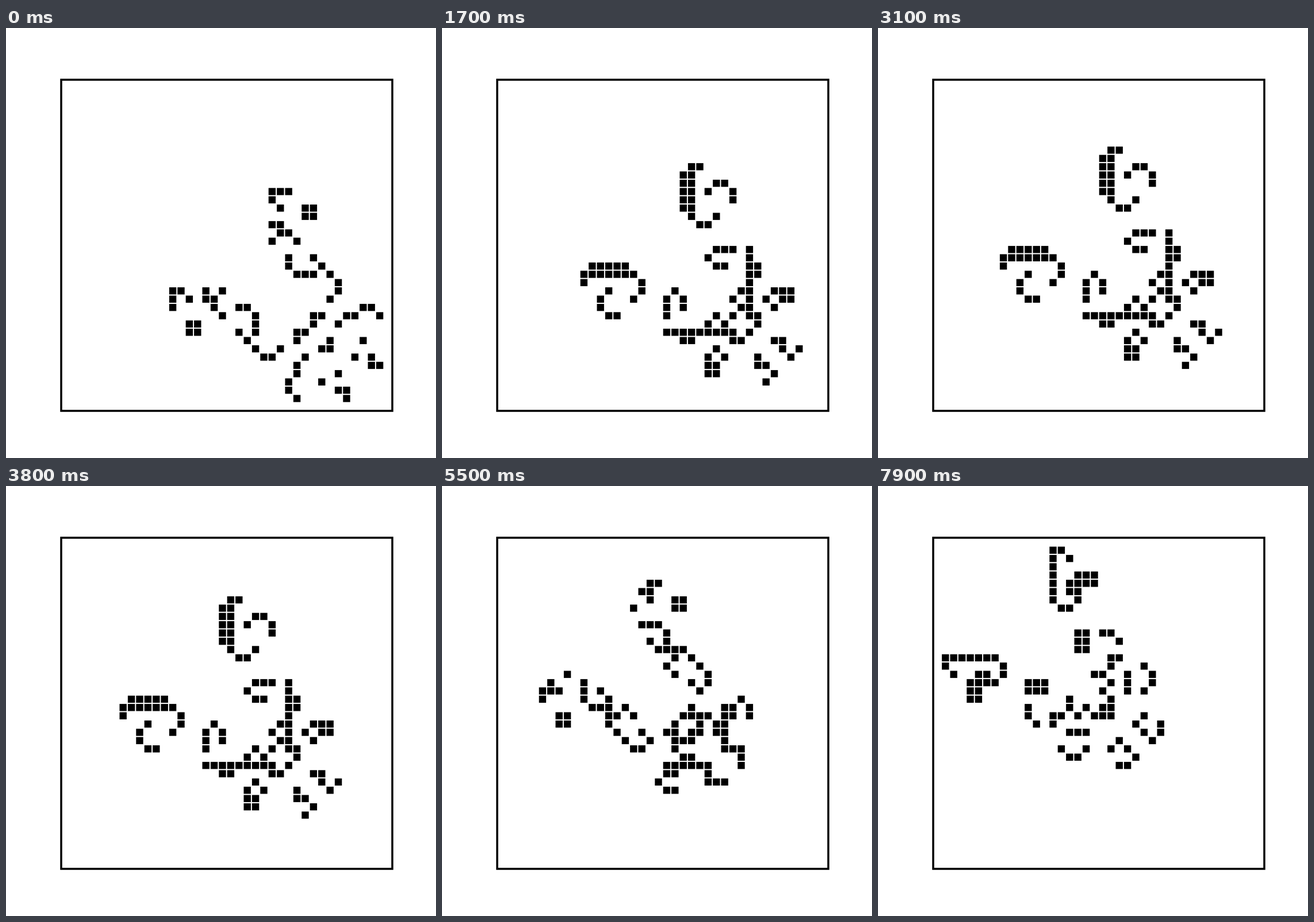
These frames come from a looping animation (748 px wide and 748 px high, 8000 ms). An HTML page with a canvas:

```html
<!DOCTYPE html>
<html>
<head>
<meta charset="utf-8">
<title>Diagonal spaceship</title>
<style>
  html, body { margin: 0; width: 100%; height: 100%; overflow: hidden; background: #fff; }
  canvas { display: block; }
</style>
</head>
<body>
<canvas id="stage" width="748" height="748"></canvas>
<script>
const ctx = document.getElementById('stage').getContext('2d');
const CELLS = 40, PITCH = 14.4, SIZE = 12.4, LEFT = 95.7, TOP = 90.1;
const STEP = 100, GENERATIONS = 80, LEAD = 4, OFFSET = 3;

let grid = Array.from({ length: CELLS }, () => Array(CELLS).fill(0));

// Walks from a cell along compass moves such as 'S6', mirrored across the diagonal.
function stroke(x, y, moves) {
  const mark = () => { grid[y + OFFSET][x + OFFSET] = grid[x + OFFSET][y + OFFSET] = 1; };
  mark();
  for (const move of moves.split(' ')) {
    const dx = move.includes('E') - move.includes('W');
    const dy = move.includes('S') - move.includes('N');
    const count = parseInt(move.replace(/\D/g, '')) || 1;
    for (let i = 0; i < count; i++) {
      x += dx;
      y += dy;
      mark();
    }
  }
}

// Claw
stroke(24, 10, 'W S6 SE E NE');
stroke(22, 11, 'S4');
stroke(25, 13, 'NE E SE S');
// Arm and body
stroke(28, 20, 'W2 SW SE E');
stroke(30, 20, 'S8 E S SW');
stroke(31, 22, 'S');
stroke(29, 25, 'SW SE SW');
// Tail
stroke(33, 27, 'NW NE E2 S W');
stroke(33, 31, 'E S SE NE');

function neighbours(row, col) {
  let count = -grid[row][col];
  for (let y = row - 1; y <= row + 1; y++) {
    for (let x = col - 1; x <= col + 1; x++) count += grid[y]?.[x] ?? 0;
  }
  return count;
}

// Conway's rule: born on 3, survives on 2 or 3.
function evolve() {
  grid = grid.map((line, row) => line.map((alive, col) => {
    const count = neighbours(row, col);
    return count === 3 || (alive && count === 2) ? 1 : 0;
  }));
}

for (let i = 0; i < LEAD; i++) evolve();
const history = [];
while (history.length < GENERATIONS) {
  history.push(grid);
  evolve();
}

function draw(cells) {
  ctx.fillStyle = '#fff';
  ctx.fillRect(0, 0, 748, 748);
  ctx.lineWidth = 3.5;
  ctx.strokeRect(96, 90, 576, 576);
  ctx.fillStyle = '#000';
  const inset = (PITCH - SIZE) / 2;
  cells.forEach((line, row) => line.forEach((alive, col) => {
    if (alive) ctx.fillRect(LEFT + col * PITCH + inset, TOP + row * PITCH + inset, SIZE, SIZE);
  }));
}

const start = performance.now();
function tick() {
  const elapsed = performance.now() - start;
  draw(history[Math.floor(elapsed / STEP) % GENERATIONS]);
  requestAnimationFrame(tick);
}
tick();
</script>
</body>
</html>
```
